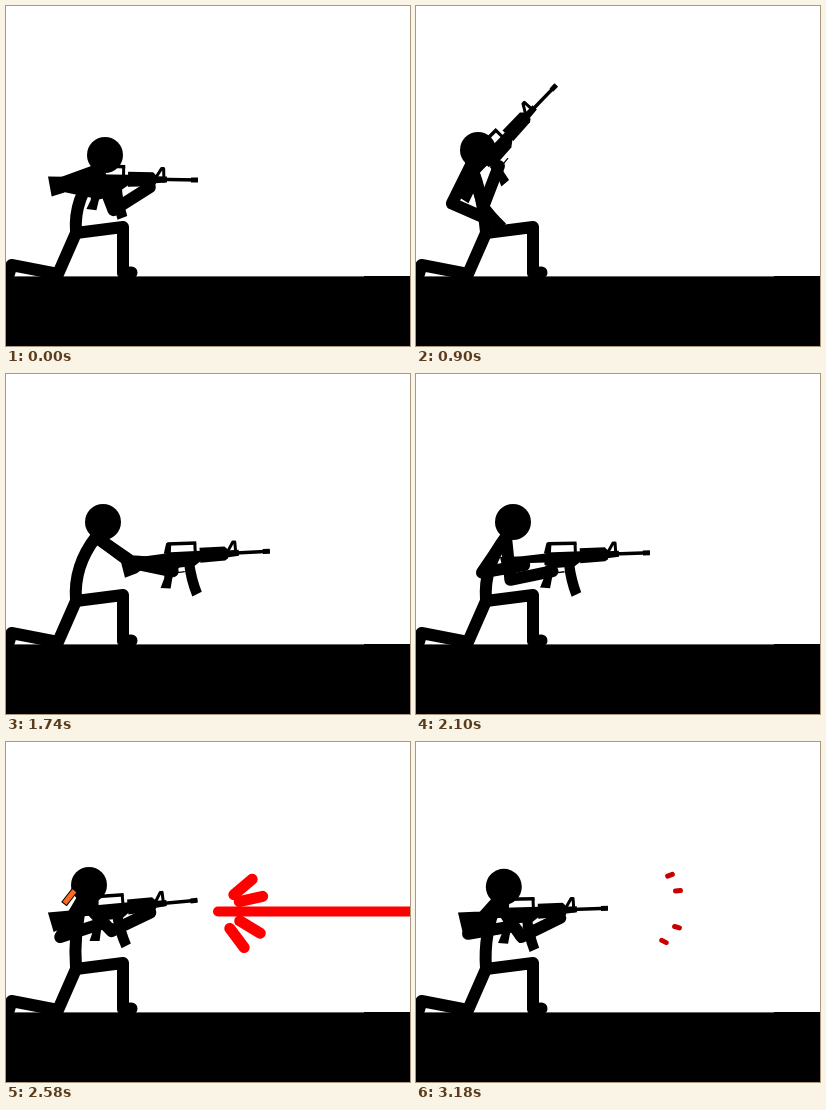
Recreate the animation shown at these times as an HTML page with a canvas. Size 404 px wide and 340 px high, loop 3240 ms.

```html
<!DOCTYPE html>
<html lang="en">
<head>
<meta charset="utf-8">
<title>Kneeling shooter</title>
<style>
  html, body { margin: 0; width: 100%; height: 100%; overflow: hidden; background: #fff; }
  canvas { display: block; }
</style>
</head>
<body>
<canvas id="stage" width="404" height="340"></canvas>
<script>
const ctx = document.getElementById('stage').getContext('2d');
const LOOP = 3240, STEP = 60, ARM = 43;
const SHOTS = [60, 2520, 2940];

// butt x, y, tilt in degrees, head x, y, place of the front hand along the rifle
const AIM    = [42, 171.4, 1, 99, 149, 102];
const LIFT   = [32, 183.3, -37, 62, 144, 80];
const HOLD   = [36, 187, -46, 62, 144, 80];
const PUSH   = [36, 188, -60, 62, 144, 80];
const READY  = [35.6, 188.6, -51, 62, 144, 80];
const SWING  = [123, 173, -22, 95, 147, 60];
const THRUST = [114, 185, -3, 97, 148, 54];
const DRAW   = [84, 184, -2, 97, 148, 24];

const MOVES = [
  [0, AIM], [360, AIM], [480, LIFT], [600, HOLD], [1080, HOLD], [1140, PUSH],
  [1260, READY], [1440, HOLD], [1620, SWING], [1740, THRUST], [1860, THRUST],
  [2100, DRAW], [2280, AIM], [LOOP, AIM]
];

// Where the front hand goes while it changes the magazine.
const REACH = [
  [480, [114, 162]], [600, [148, 163]], [840, [72, 222]],
  [1140, [104, 152]], [1260, [119, 175]]
];

const rad = d => d * Math.PI / 180;
const clamp = v => Math.max(0, Math.min(1, v));
const ease = u => u * u * (3 - 2 * u);
const mix = (a, b, u) => a.map((v, i) => v + (b[i] - v) * u);

function along(keys, t) {
  const i = keys.findIndex(k => k[0] > t);
  if (i < 0) return keys[keys.length - 1][1];
  if (i === 0) return keys[0][1];
  const [t0, a] = keys[i - 1], [t1, b] = keys[i];
  return mix(a, b, ease((t - t0) / (t1 - t0)));
}

// Steps since the latest shot, or -1 when its flash is over.
function sinceShot(t) {
  const shot = SHOTS.find(s => t >= s && t < s + 5 * STEP);
  return shot === undefined ? -1 : (t - shot) / STEP;
}

function line(width, color, ...p) {
  ctx.lineWidth = width;
  ctx.strokeStyle = color;
  ctx.beginPath();
  for (let i = 0; i < p.length; i += 2) ctx.lineTo(p[i], p[i + 1]);
  ctx.stroke();
}
const limb = (...p) => line(12, '#000', ...p);

function poly(...p) {
  ctx.beginPath();
  for (let i = 0; i < p.length; i += 2) ctx.lineTo(p[i], p[i + 1]);
  ctx.fill();
}

function placed(x, y, deg, draw) {
  ctx.save();
  ctx.translate(x, y);
  ctx.rotate(rad(deg));
  draw();
  ctx.restore();
}

// Two equal bones from shoulder to hand, the elbow on the lower side.
function arm([sx, sy], [hx, hy]) {
  const dx = hx - sx, dy = hy - sy, d = Math.hypot(dx, dy);
  const bend = Math.sqrt(Math.max(0, ARM * ARM - d * d / 4)) / d;
  limb(sx, sy, (sx + hx) / 2 - dy * bend, (sy + hy) / 2 + dx * bend, hx, hy);
}

const CLIP = new Path2D('M-16 -5Q0 -5 14 -8L17 2Q0 6 -16 5Z');
const clip = (x, y, deg) => placed(x, y, deg, () => ctx.fill(CLIP));

// The butt is the origin, the barrel lies along x.
function rifle(loaded) {
  ctx.lineCap = 'butt';
  line(3.5, '#000', 106, 0, 150, 0);
  line(5, '#000', 143, 0, 150, 0);
  line(3, '#000', 108, -2, 113.5, -11, 115.5, -11, 116, 3);
  poly(107, -3, 119, -3, 119, 3, 107, 4);
  poly(80, -7, 105, -7, 108, -4, 108, 5, 105, 7, 80, 8);
  poly(46, -4, 81, -4, 81, 6, 74, 11, 52, 12, 44, 8);
  line(3.5, '#000', 48, -12.5, 77, -12);
  line(3, '#000', 75.5, -12, 75.5, -3);
  poly(47, -13.5, 52, -13, 51, -3, 44, -3);
  poly(45, 9, 54, 10, 52, 20, 51, 23, 49, 32, 39, 31, 43, 22);
  line(1.3, '#000', 53, 17, 64, 16);
  poly(0, -1, 17, -1, 22, -1, 46, -3, 46, 6, 30, 6, 16, 15, 4, 19);
  if (loaded) clip(70.5, 24, 84);
  ctx.lineCap = 'round';
}

function scenery() {
  ctx.fillStyle = '#fff';
  ctx.fillRect(0, 0, 404, 340);
  ctx.fillStyle = '#000';
  ctx.fillRect(0, 270.4, 404, 70);
  ctx.fillRect(358, 270, 46, 2);
  limb(70, 227, 117, 221, 117, 266);
  limb(117, 267, 125.5, 266.5);
  limb(70, 227, 52, 268, 5.5, 259, 3, 268);
}

// The old magazine is pulled, carried and dropped; a new one comes from the hip.
function looseClip(t, [x, y]) {
  if (t >= 480 && t < 840) {
    const fall = Math.max(0, (t - 600) / STEP);
    const [hx, hy] = along(REACH, Math.min(t, 600));
    clip(hx + 3 * fall, hy - 4 + 11 * fall * fall, 8 + (t - 480) / 3);
  } else if (t >= 840 && t < 1140) {
    clip(x, y - 4, 60 - (t - 840) / 11);
  }
}

function figure(t) {
  let [bx, by, tilt, hx, hy, slide] = along(MOVES, t);
  const k = sinceShot(t);
  if (k >= 0) {
    const recoil = Math.min(1, 1.1 - k / 10);
    hx -= 16 * recoil;
    hy -= 6 * recoil;
    tilt -= 6 * recoil * recoil;
  }
  const c = Math.cos(rad(tilt)), s = Math.sin(rad(tilt));
  const onRifle = (x, y) => [bx + x * c - y * s, by + x * s + y * c];
  const shoulder = [hx - 7, hy + 15];
  const away = clamp((t - 360) / 120) * clamp((1560 - t) / 240);
  const hand = mix(onRifle(slide, 8), along(REACH, t), away);

  ctx.lineWidth = 12;
  ctx.strokeStyle = '#000';
  ctx.beginPath();
  ctx.moveTo(70, 226);
  ctx.quadraticCurveTo(67.5, 192, ...shoulder);
  ctx.stroke();
  arm(shoulder, onRifle(52, 15));
  placed(bx, by, tilt, () => rifle(t < 480 || t >= 1140));
  looseClip(t, hand);
  arm(shoulder, hand);
  ctx.beginPath();
  ctx.arc(hx, hy, 18, 0, 7);
  ctx.fill();
}

function blast(k) {
  const u = (k - 1) / 3;
  const color = `rgb(${Math.min(255, Math.round(255 - 55 * u))},0,0)`;
  if (k < 3) line(k < 2 ? 10 : 6, color, [199, 212, 300][k], 169.5, 420, 169.5);
  for (const [x, y, deg] of [[237, 145, -40], [245, 157, -13], [244, 185, 31], [231, 196, 53]]) {
    const half = 12 - 9.5 * u;
    placed(x + 17 * u, y + (0.3 * (y - 171) - 4) * u, deg * (1 - u / 2),
      () => line(11 - 6 * u, color, -half, 0, half, 0));
  }
  if (k > 0 && k < 4) shell(k - 1);
}

function shell(n) {
  placed(63.5 - 27 * n, 155 + 4 * n * n, -52 - 60 * n, () => {
    ctx.fillStyle = '#000';
    ctx.fillRect(-9, -3.5, 18, 7);
    ctx.fillStyle = '#ff6a1a';
    ctx.fillRect(-8, -2.5, 16, 5);
  });
}

function draw(t) {
  ctx.lineCap = ctx.lineJoin = 'round';
  scenery();
  figure(t);
  const k = sinceShot(t);
  if (k >= 0) blast(k);
}

const start = performance.now();
function tick() {
  const t = (performance.now() - start) % LOOP;
  draw(Math.floor(t / STEP) * STEP);
  requestAnimationFrame(tick);
}
tick();
</script>
</body>
</html>
```
